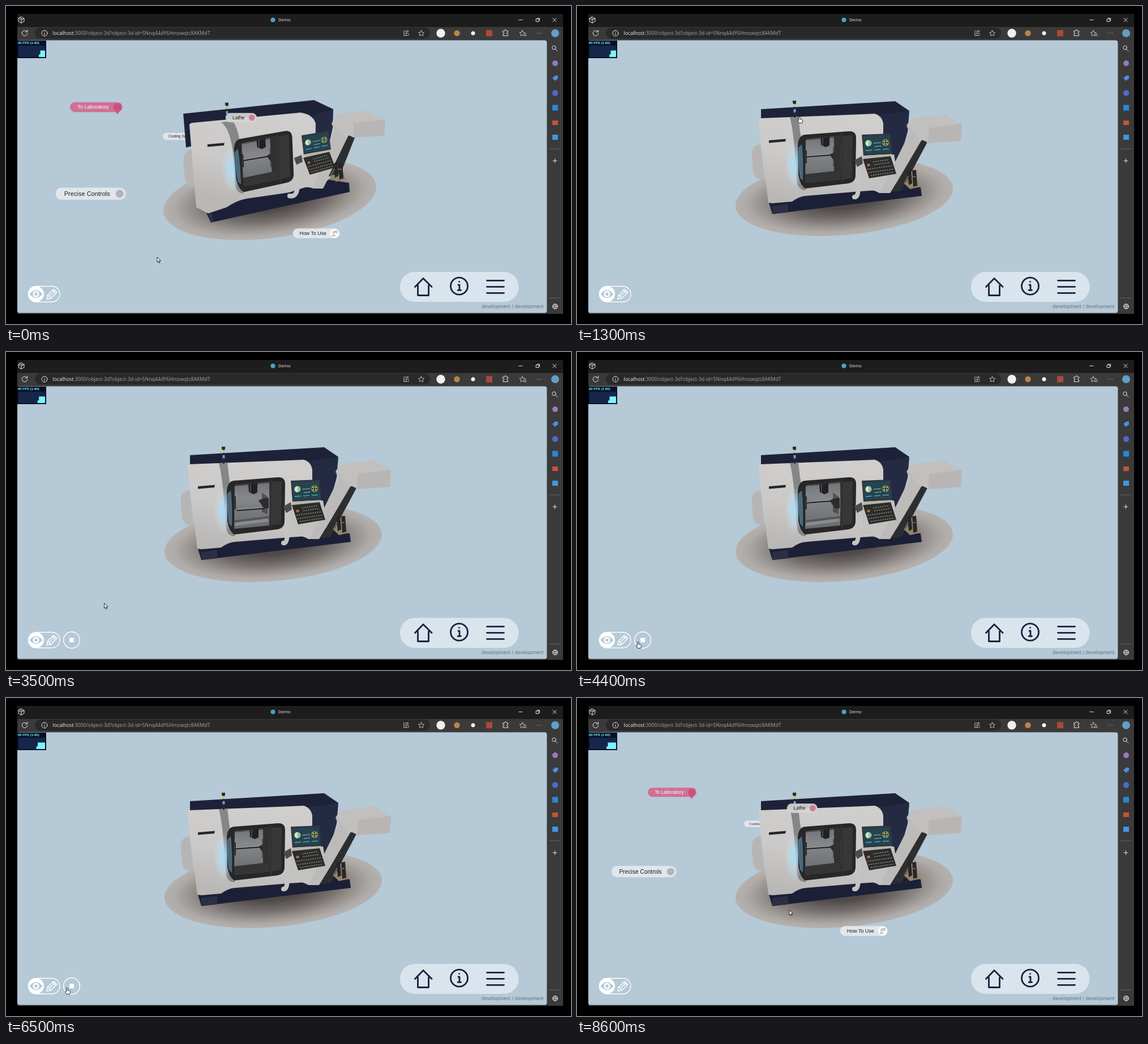
Write an HTML page that moves like this. It is 998 by 561 pixels and loops after 8.7 s.

```html
<!DOCTYPE html>
<html lang="en">
<head>
<meta charset="utf-8">
<title>Demo</title>
<style>
  html, body { margin: 0; width: 100%; height: 100%; overflow: hidden; background: #000; }
  svg { display: block; width: 100%; height: 100%; }
  text { font-family: "Liberation Sans", Arial, sans-serif; white-space: pre; }
  .ui { font-family: "Open Sans", "Noto Sans", sans-serif; }
  .line { fill: none; stroke: #e4e4e4; stroke-width: 1; stroke-linecap: round; stroke-linejoin: round; }
  .nav { fill: none; stroke: #16213f; stroke-width: 2.8; stroke-linecap: round; stroke-linejoin: round; }
</style>
</head>
<body>
<svg viewBox="0 0 998 561" xmlns="http://www.w3.org/2000/svg">
  <defs>
    <radialGradient id="floorFill">
      <stop offset=".3" stop-color="#4f4a48"/><stop offset=".56" stop-color="#736e6b"/>
      <stop offset=".76" stop-color="#98938f"/><stop offset=".9" stop-color="#aeaaa7"/><stop offset="1" stop-color="#b5b1af"/>
    </radialGradient>
    <linearGradient id="bodyFill" gradientUnits="userSpaceOnUse" x1="430" y1="195" x2="405" y2="345">
      <stop stop-color="#cfcecc"/><stop offset=".5" stop-color="#cbcac9"/><stop offset="1" stop-color="#b9b8b6"/>
    </linearGradient>
    <radialGradient id="glow">
      <stop stop-color="#a5dcfb"/><stop offset="1" stop-color="#c9e6f5" stop-opacity="0"/>
    </radialGradient>
    <linearGradient id="wall" x2="0" y2="1">
      <stop stop-color="#707175"/><stop offset=".35" stop-color="#85878a"/><stop offset="1" stop-color="#68696d"/>
    </linearGradient>
    <clipPath id="window"><path d="M404 235L465 229L466 306L403 312Z"/></clipPath>
  </defs>

  <!-- browser window -->
  <path fill="#1d1d1d" d="M20 14H984V38H20Z"/>
  <path fill="#3a3a3a" d="M20 37H984V543H20Z"/>
  <rect x="51" y="38" width="698" height="19.500" rx="9.700" fill="#292929"/>
  <path class="line" d="M27 19L32 22V27L27 30L22 27V22ZM22 22L27 24.500L32 22M27 24.500V30M24.500 20.500L29.500 23"/>
  <circle cx="471.500" cy="24.500" r="4" fill="#4aa5c0"/>
  <text class="ui" x="481" y="27.300" font-size="7.700" fill="#f2f2f2">Demo</text>
  <path class="line" d="M906 24.500H912M936.500 23H941V27.500H936.500ZM938 21.500H942.500V26M966 21.500L972 27.500M972 21.500L966 27.500"/>
  <path class="line" d="M37 45.500A4.700 4.700 0 1 0 37.700 48.500M37.700 42.500V45.800H34.400"/>
  <circle class="line" cx="68" cy="48" r="5"/>
  <path class="line" d="M68 47.500V50.500M68 45.300V45.400"/>
  <text class="ui" x="82.500" y="51" font-size="8.780" fill="#a5a5a5"><tspan fill="#f1f1f1">localhost</tspan>:3000/object-3d?object-3d-id=5Nnq44dY6Hmzwqtc8AKMdT</text>
  <path class="line" stroke-opacity=".6" d="M703 44H707V52H703ZM703 48H711V52H703M709.500 42.500V46.500M707.500 44.500H711.500"/>
  <path id="star" class="line" stroke-opacity=".75" d="M733.500 43L735 46.300L738.500 46.700L736 49L736.700 52.500L733.500 50.800L730.300 52.500L731 49L728.500 46.700L732 46.300Z"/>
  <circle cx="768" cy="48" r="7.700" fill="#f0f0f0"/>
  <circle cx="796.500" cy="48" r="5.200" fill="#bd8248"/>
  <circle cx="825" cy="48" r="3.500" fill="#f4f4f4"/>
  <path fill="#aa4939" d="M848 42.500H859V53.500H848Z"/>
  <path class="line" d="M878 44H881Q880.500 41.800 882.500 41.800T884 44H886.500V47Q884.500 46.500 884.500 48.300T886.500 49.700V52.500H878V49.700Q880 49.700 880 48.300T878 47Z"/>
  <use href="#star" x="178.500"/>
  <path class="line" d="M917 49H919M916 52H919M938.500 48H938.600M942 48H942.100M945.500 48H945.600"/>
  <circle cx="970" cy="48" r="7" fill="#619fc7"/>
  <circle class="line" cx="968" cy="73.500" r="3.300"/>
  <path class="line" d="M970.500 76L974 79.500"/>
  <circle cx="970" cy="101" r="5" fill="#9a78bd"/>
  <path fill="#4a8fe0" d="M965 127L970.500 122.500L975 123L975 128L969.500 132Z"/>
  <circle cx="970" cy="153.500" r="5.200" fill="#5268c9"/>
  <path fill="#2a86d8" d="M965 174.500H975V184.500H965Z"/>
  <path fill="#c8513b" d="M965 202H975V210H965Z"/>
  <path fill="#3c98e4" d="M965 227H975V236H965Z"/>
  <path class="line" d="M960 252H979M960 515H979" opacity=".25"/>
  <path class="line" d="M966 273H973M969.500 269.500V276.500"/>
  <circle class="line" cx="970" cy="530" r="4.500" stroke-dasharray="2.200 1.300"/>
  <circle class="line" cx="970" cy="530" r="3.500"/>
  <circle class="line" cx="970" cy="530" r="1.300"/>

  <!-- page -->
  <rect x="20" y="60.500" width="935.400" height="480.900" rx="4" fill="#b5c9d7"/>
  <path fill="#061129" d="M20 61H71V92H20Z"/>
  <path fill="#162649" d="M22 70H69V90H22Z"/>
  <text x="21" y="67.200" font-size="6" font-weight="700" fill="#7df3fa">60 FPS (1-60)</text>
  <path id="fps" fill="#7df3fa"/>

  <g id="hidden-labels"></g>
  <ellipse id="floor" fill="url(#floorFill)"/>
  <g id="rear"></g>
  <g id="slot"><path fill="#252629" d="M339 237L369 234.500L368 239L339 241.500Z"/></g>
  <g id="door">
    <ellipse cx="384" cy="280" rx="17" ry="42" fill="url(#glow)"/>
    <path fill="#272728" d="M390 246Q391 228 403 227L480 221Q493 220 493 233L492 298Q492 311 479 313L403 322Q394 316 391 298Z"/>
    <path fill="#363736" d="M469 229L487 228L486 303L469 306Z"/>
    <path fill="#5d8ca7" opacity=".7" d="M391 250L397 244Q400 270 399 308L394 303Q390 280 391 250Z"/>
    <path stroke="#2a4254" stroke-dasharray="1 2" d="M394 251L397 305"/>
    <g clip-path="url(#window)">
      <path fill="url(#wall)" d="M402 227H468V313H402Z"/>
      <path fill="#4a4b4e" d="M402 228L468 224V231L404 237Z"/>
      <path fill="#55565a" d="M403 297L468 289V293L403 301Z"/>
      <path fill="#8b8c90" d="M405 301L462 294L463 299L404 307Z"/>
      <path fill="#2b2c2e" d="M452 248L462 255V286L452 282Z" opacity=".55"/>
      <path fill="#2c2d30" d="M396 252L406 255V277L396 281Z"/>
      <g id="tool"><path fill="#202124" d="M428 229L444 227V248L437 251L429 247Z"/><path stroke="#6e7174" d="M432 230V247"/></g>
      <g id="shaft"><path stroke="#232427" stroke-width="2.600" d="M404 266L453 262.500"/><path stroke="#b6b8ba" stroke-width=".8" d="M405 264.500L452 261"/></g>
      <path fill="#2b2c2e" d="M446 262L455 258L464 257V276H456Z"/>
      <path id="glass" fill="#303130" d="M454 226H494V314H454Z"/>
      <path id="sill" fill="#343537" d="M402 297L468 290V315H402Z"/>
    </g>
    <path fill="none" stroke="#4d4d4c" stroke-width=".8" d="M467 224L468 312"/>
  </g>
  <g id="front"></g>
  <g id="panel">
    <path fill="#30363d" d="M503 227L554 225L557 261L506 264Z"/>
    <path fill="#264350" d="M505 230L552 228L555 258L508 261Z"/>
    <circle cx="515" cy="242" r="5.500" fill="#8fc49c"/><path fill="#d5e2c0" d="M515 242V236.500A5.500 5.500 0 0 0 515 247.500Z"/>
    <circle cx="545" cy="241" r="6" fill="#8f985c"/>
    <path stroke="#142328" stroke-width="2" stroke-dasharray="2 1.500" d="M540 241H551M545 236V247"/>
    <path stroke="#9dbcc4" stroke-width="1.500" stroke-dasharray="2 1" d="M524 242L537 241M526 248L538 247"/>
    <path stroke="#4fb2c4" stroke-width="1.300" stroke-dasharray="11 4" d="M510 255L552 252"/>
    <path fill="#b5b6ab" d="M506 264L556 261L554 267L507 271Z"/>
    <path fill="#2b2c2b" d="M505 270L554 265L564 296L516 304Z"/>
    <path fill="none" stroke="#85867c" stroke-width="1.500" stroke-dasharray="2.500 1.600" d="M523 275L551 271M525 280L553 276M513 288L556 282M515 294L558 288M519 299L560 293"/>
    <path fill="#b56b39" d="M512 279L517 278L518 282L513 283Z"/>
  </g>
  <g id="pump">
    <path fill="#93836c" d="M577 312L600 308L606 319L588 323Z"/>
    <path fill="#272626" d="M584 291L590 288L592 313L586 316ZM592 290L599 289L601 317L594 319Z"/>
    <path stroke="#78664d" stroke-width="2" d="M579 312L585 300M591 301H598"/>
  </g>
  <g id="tower">
    <path fill="#292b32" d="M381 167H387V171L386 173V197H383V173L381 171Z"/>
    <path fill="#d8c95a" d="M382.500 173H386V178H382.500Z"/><path fill="#649de4" d="M382.500 182H386.500V187.500H382.500Z"/>
  </g>
  <g id="labels"></g>

  <!-- page controls -->
  <rect x="39.500" y="494.500" width="55.500" height="27.500" rx="13.700" fill="none" stroke="#fff" stroke-width="1.300"/>
  <circle cx="53" cy="508.200" r="14" fill="#fff"/>
  <path fill="#b5c9d7" d="M41.500 508.200Q53 494.500 64.500 508.200Q53 522 41.500 508.200Z"/>
  <circle cx="53" cy="508.200" r="5.600" fill="#fff"/><circle cx="53" cy="508.200" r="2.700" fill="#b5c9d7"/>
  <path fill="none" stroke="#fff" stroke-width="1.400" stroke-linejoin="round" d="M72 517L73.500 510L84 499.500L90 505L79.500 515.500ZM82 501.500L88 507M73.500 510L79.500 515.500M76.500 512L86.500 502.500"/>
  <g id="stop"><circle cx="116" cy="508.200" r="14.400" fill="none" stroke="#fff" stroke-width="1.400"/><path fill="#fff" d="M112 504.200H120V512.200H112Z"/></g>
  <rect x="696" y="469" width="209.500" height="53" rx="26" fill="#dae4ec"/>
  <path class="nav" d="M722.500 495.500L737 480.500L752 495.500M727.500 493V510.500H746.500V493"/>
  <circle class="nav" cx="800.500" cy="494.200" r="15"/>
  <path class="nav" d="M799 492H801V501M798 501.300H803.500M800.500 486.500V486.600M849.500 484.300H879.500M849.500 495.300H879.500M849.500 506.300H879.500"/>
  <text x="949.500" y="533" text-anchor="end" font-size="8.300" fill="#617381" style="font-family:Inter,sans-serif">development / development</text>

  <g id="pointer">
    <path id="arrow" fill="#fff" stroke="#111" stroke-width=".9" d="M0 0V9L2.100 7L3.600 10.300L5 9.600L3.500 6.400H6.300Z"/>
    <path id="hand" fill="#fff" stroke="#111" stroke-width=".9" stroke-linejoin="round" d="M-1.300 -4Q0 -5.500 1 -4V-.5L4.500 .5Q6 1 5.500 3L4.500 6.500H-.5L-3.500 2.500Q-3.500 1 -1.300 2Z"/>
  </g>
</svg>
<script>
const LOOP = 8700;
const $ = id => document.getElementById(id);
const lerp = (a, b, k) => a + (b - a) * k;

function add(parent, tag, attrs, text = '') {
  const el = document.createElementNS('http://www.w3.org/2000/svg', tag);
  for (const name in attrs) el.setAttribute(name, attrs[name]);
  el.textContent = text;
  return parent.appendChild(el);
}

// Machine outlines: layer, colour, settled path, path before the camera turn.
const outlines = [
  ['rear', '#252a43', 'M500 188L587 185L584 222L562 300L545 325L520 320Z', 'M505 187L578 182L577 215L560 290L550 315L525 310Z'],
  ['rear', '#1e2238', 'M325 182L562 168L587 185L541 192L325 199Z', 'M313 190L544 166L578 182L546 192L318 250Z'],
  ['rear', '#1c2037', 'M339 347L345 367L609 335L607 320L560 312L400 325Z', 'M354 365L362 382L607 328L606 312L560 305L400 330Z'],
  ['rear', '#2b2f44', 'M345 353L373 349L373 364L345 367Z', 'M357 367L363 365L367 380L362 382Z'],
  ['rear', '#b7b5b3', 'M324 244C309 246 308 255 309 270L311 292C313 303 320 306 332 306Z', 'M328 253C313 257 312 270 314 285L316 303C318 317 322 319 335 320Z'],
  ['rear', 'url(#bodyFill)', 'M320 201Q320 198 325 198L526 190Q538 193 541 207L541 324L500 327L404 335Q392 336 380 345L345 348L338 347Z',
    'M324 210Q324 207 330 206L520 188Q542 191 547 207L546 314L500 329L424 340Q408 343 390 355L357 366L336 355Z'],
  ['rear', '#858688', 'M376 196L391 195Q393 215 396 235Q389 245 391 290Q394 315 404 321L404 325Q392 325 389 312L384 250Q381 215 376 196Z',
    'M380 205L401 203Q409 215 413 238Q405 250 406 292Q410 318 420 326L419 331Q408 330 405 318L401 260Q397 218 380 205Z'],
  ['front', '#c4c2c1', 'M502 262L560 262L566 297L549 330L534 330Q520 321 502 326Z', 'M520 260L575 256L588 288L553 322L543 322Q530 316 515 325Z'],
  ['front', '#bdbbba', 'M582 212L608 216L612 234L553 330L535 330L588 222Z', 'M575 208L600 212L609 228L560 322L543 322L580 217Z'],
  ['front', '#2d2e30', 'M609 236L619 240L573 326L555 328Z', 'M606 226L617 230L588 303L570 300Z'],
  ['front', '#c2c0bf', 'M582 211Q586 203 596 197L650 191L680 208L678 238L620 242Q612 234 606 238L588 214Z',
    'M575 208Q579 196 587 190L633 184L670 200L668 229L613 232Q606 226 600 230L582 212Z'],
  ['front', '#b8b6b5', 'M622 215L680 208L678 238L620 242Z', 'M614 207L670 200L668 229L613 232Z'],
  ['front', '#c6c4c3', 'M499 278Q496 300 497 318Q497 338 490 337', 'M516 275Q514 300 515 315Q515 338 501 335', 8],
  ['front', '#4a4b4c', 'M490 272L503 265L505 278L495 284Z', 'M509 268L522 263L524 275L513 280Z'],
].map(([layer, color, end, start, width]) => ({
  end,
  start: start.match(/[\d.]+/g),
  el: add($(layer), 'path', width
    ? { fill: 'none', stroke: color, 'stroke-width': width, 'stroke-linecap': 'round' }
    : { fill: color }),
}));

// Flat details and the transform each has before the camera turn.
const details = {
  door: [1.006, -.101, .056, .988, -3.4, 50.8],
  panel: [.9425, -.1206, .0335, .9247, 40.3, 78.9],
  pump: [1, 0, 0, 1, -5, -13],
  tower: [1, 0, 0, 1, 6, 3.5],
  slot: [1, 0, 0, 1, 17, 7],
};

// Labels: x, y and scale before and after the turn.
const labels = [
  { text: 'Cooling System', width: 118, inset: 15.5, from: [277, 230, .64], to: [295, 222, .6], layer: 'hidden-labels', icon: '#bbb' },
  { text: 'To Laboratory', width: 103, inset: 15, from: [113, 178.5, .9], to: [125, 166.3, .835], icon: '#cf537f', pill: '#d06b92', color: '#fff' },
  { text: 'Lathe', width: 64, inset: 14, from: [388, 197, .86], to: [370.7, 194.5, .845], icon: '#d77f9a', pill: '#d6d6d7' },
  { text: 'Precise Controls', width: 112, inset: 13.5, from: [88, 331.3, 1.107], to: [60.7, 306.3, 1.025], icon: '#b9bbbd' },
  { text: 'How To Use', width: 94, inset: 13.5, from: [507, 401, .88], to: [464.8, 411, .892], icon: '#fff' },
];
for (const l of labels) {
  l.el = add($(l.layer || 'labels'), 'g', {});
  const cx = l.width - 10;
  const pin = l.color === '#fff';
  const person = l.icon === '#fff';
  add(l.el, 'rect', { y: -9.7, width: l.width, height: 19.4, rx: 9.7, fill: l.pill || '#e5e9ed', opacity: .93 });
  if (pin) add(l.el, 'path', { d: `M${cx - 8} 3L${cx} 14L${cx + 8} 3Z`, fill: l.icon });
  add(l.el, 'circle', { cx, r: person ? 9 : pin ? 8 : 6.5, fill: l.icon });
  if (person) add(l.el, 'path', { d: `M${cx - 5} 5Q${cx - 2} -1 ${cx + 1} 5ZM${cx - 4} -2A2 2 0 1 0 ${cx} -2A2 2 0 1 0 ${cx - 4} -2M${cx + 1} -5H${cx + 5}V-1H${cx + 2}Z`, fill: 'none', stroke: '#8d8477' });
  else add(l.el, 'circle', { cx, r: 3.6, fill: 'none', stroke: pin ? '#b83462' : '#777', 'stroke-width': .8, opacity: .5 });
  add(l.el, 'text', { x: l.inset, y: 3.4, 'font-size': 10, fill: l.color || '#1d1d1f' }, l.text);
}

// Tracks: [time, value...]
const tracks = {
  pointer: [[0, 267, 443], [100, 267, 443], [600, 355, 229], [900, 393, 200], [2950, 393, 200], [3750, 108, 516],
    [6850, 108, 516], [7250, 310, 408], [8100, 375, 374]],
  labels: [[0, 1], [1000, 1], [1250, 0], [7250, 0], [7700, 1]],
  open: [[0, 0], [1500, 0], [2000, 1], [5600, 1], [6300, 0]],
  shaft: [[0, 0], [1600, 0], [2500, 27], [3000, 27], [4000, 0]],
};
const smooth = k => k * k * (3 - 2 * k);
function sample(track, t) {
  const i = track.findIndex(key => key[0] > t);
  if (i < 0) return track[track.length - 1].slice(1);
  const [a, b] = [track[i - 1], track[i]];
  const k = smooth((t - a[0]) / (b[0] - a[0]));
  return a.slice(1).map((v, n) => lerp(v, b[n + 1], k));
}

function drawCamera(turn) {
  for (const { el, end, start } of outlines) {
    let i = 0;
    el.setAttribute('d', end.replace(/[\d.]+/g, n => lerp(+n, +start[i++], turn).toFixed(2)));
  }
  const identity = [1, 0, 0, 1, 0, 0];
  for (const id in details) {
    const m = identity.map((v, i) => lerp(v, details[id][i], turn));
    $(id).setAttribute('transform', `matrix(${m})`);
  }
  const [x, y, rx, ry, angle] = [[472, 466], [337, 340], [192.7, 189.3], [67, 69.5], [-5.1, -7.3]].map(([a, b]) => lerp(a, b, turn));
  $('floor').setAttribute('transform', `translate(${x} ${y}) rotate(${angle})`);
  $('floor').setAttribute('rx', rx);
  $('floor').setAttribute('ry', ry);
  for (const l of labels) {
    const [lx, ly, s] = l.to.map((v, i) => lerp(v, l.from[i], turn));
    l.el.setAttribute('transform', `translate(${lx} ${ly}) scale(${s})`);
  }
}

function render(t) {
  drawCamera(Math.exp(-t / 150));
  const [shown] = sample(tracks.labels, t);
  for (const l of labels) l.el.setAttribute('opacity', shown);

  const [open] = sample(tracks.open, t);
  const [drop] = sample(tracks.shaft, t);
  $('glass').setAttribute('transform', `translate(${open * 11})`);
  $('sill').setAttribute('transform', `translate(0 ${open * 16})`);
  $('tool').setAttribute('transform', `translate(${(1 - open) * 2} ${(1 - open) * -2})`);
  $('shaft').setAttribute('transform', `translate(${drop / 4} ${drop})`);

  const [x, y] = sample(tracks.pointer, t);
  $('pointer').setAttribute('transform', `translate(${x} ${y})`);
  const overButton = (t > 820 && t < 3050) || (t > 3680 && t < 6920);
  $('hand').setAttribute('visibility', overButton ? 'visible' : 'hidden');
  $('arrow').setAttribute('visibility', overButton ? 'hidden' : 'visible');
  $('stop').setAttribute('visibility', t >= 1500 && t < 6900 ? 'visible' : 'hidden');

  const left = 60.5 - 6 * t / LOOP;
  $('fps').setAttribute('d', `M${left} 78.500H69V90H${left - 2.5}V85.500H${left}Z`);
}

const began = performance.now();
function tick() {
  render((performance.now() - began) % LOOP);
  requestAnimationFrame(tick);
}
tick();
</script>
</body>
</html>
```
